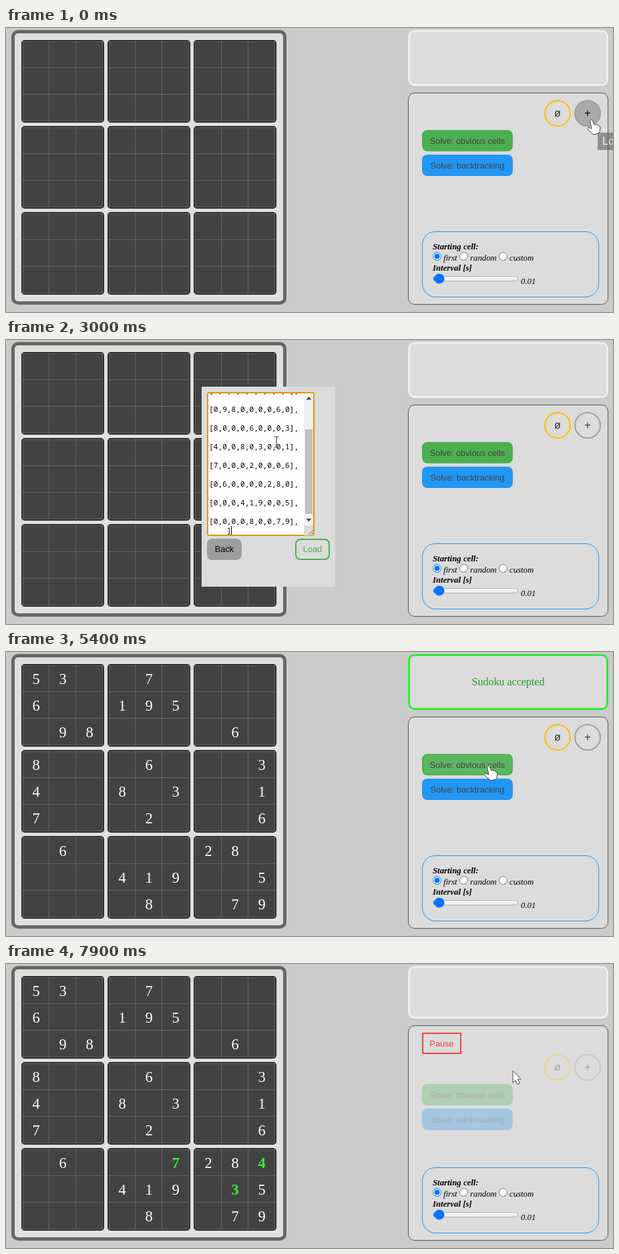
An HTML page for the animation above (8000 ms loop, 909 px wide and 426 px high).

```html
<!DOCTYPE html>
<html lang="en">
<head>
<meta charset="utf-8">
<title>Sudoku solver</title>
<style>
html, body { margin: 0; width: 100%; height: 100%; overflow: hidden; background: #cbcbcb; }
svg { display: block; width: 909px; height: 426px; }
text { white-space: pre; }
.sans { font: 12.8px "Liberation Sans", Arial, sans-serif; text-anchor: middle; }
.sign { font-size: 16px; }
.serif { font: 16px "Liberation Serif", Times, serif; text-anchor: middle; }
.digit { font-size: 22.4px; fill: #fff; }
.label { font: italic 12.8px "Liberation Serif", Times, serif; }
.bold { font-weight: bold; }
.mono { font: 11.2px "Noto Sans Mono", "DejaVu Sans Mono", monospace; }
</style>
</head>
<body>
<svg id="stage" viewBox="0 0 909 426"></svg>
<script>
const LOOP = 8000;
const stage = document.getElementById('stage');

function el(parent, tag, attrs = {}, content) {
  const node = document.createElementNS('http://www.w3.org/2000/svg', tag);
  set(node, attrs);
  if (content !== undefined) node.textContent = content;
  parent.appendChild(node);
  return node;
}
function set(node, attrs) {
  for (const key in attrs) node.setAttribute(key, attrs[key]);
}
const group = (parent, attrs) => el(parent, 'g', attrs);
const path = (parent, d, attrs) => el(parent, 'path', { d, ...attrs });
const circle = (parent, cx, cy, r, attrs) => el(parent, 'circle', { cx, cy, r, ...attrs });
const label = (parent, x, y, cls, content, attrs) => el(parent, 'text', { x, y, class: cls, ...attrs }, content);

// Outer box with the border drawn inside it
function box(parent, x, y, width, height, rx, fill, stroke = 'none', sw = 0) {
  return el(parent, 'rect', {
    x: x + sw / 2, y: y + sw / 2, width: width - sw, height: height - sw,
    rx: Math.max(0, rx - sw / 2), fill, stroke, 'stroke-width': sw
  });
}
const show = (node, on) => set(node, { opacity: +on });
const progress = (t, from, to) => Math.min(1, Math.max(0, (t - from) / (to - from)));
const mix = (a, b, p) => 'rgb(' + a.map((v, i) => Math.round(v + (b[i] - v) * p)) + ')';

// Board
const ROWS = '530070000 600195000 098000060 800060003 400803001 700020006 060000280 000419005 000080079'.split(' ');
const cellX = c => 25 + 40 * c + 9 * Math.floor(c / 3);
const cellY = r => 20 + 40 * r + 9 * Math.floor(r / 3);

box(stage, 8, 3, 412, 412, 10, '#dfe0de', '#666866', 5);
for (let i = 0; i < 9; i++) {
  const x = 23 + 129 * (i % 3), y = 18 + 129 * Math.floor(i / 3);
  box(stage, x, y, 124, 124, 5, '#424242', '#2b2b2b', 2);
  let d = '';
  for (let k = 0; k < 4; k++) {
    const o = 1.5 + 40 * k + (k === 0 ? 1 : 0);
    d += `M${x + o} ${y + 2}v120M${x + 2} ${y + o}h120`;
  }
  path(stage, d, { stroke: '#858585', 'stroke-dasharray': '1 1', fill: 'none' });
}
const givens = group(stage);
ROWS.forEach((row, r) => [...row].forEach((n, c) => {
  if (n !== '0') label(givens, cellX(c) + 20, cellY(r) + 28, 'serif digit', n);
}));

const found = [[7, 7, 3, 6450, 6900], [6, 5, 7, 6900, 7400], [6, 8, 4, 7400, 7900]].map(([r, c, n, on, off]) => {
  const g = group(stage);
  const mark = box(g, cellX(c), cellY(r), 40, 40, 0, '#666');
  label(g, cellX(c) + 20, cellY(r) + 28, 'serif digit bold', n, { style: 'fill:#33f033' });
  return { g, mark, on, off };
});

// Message and control panels
const message = box(stage, 602, 3, 300, 84, 10, '#dcdcdc', '#eee', 3);
const accepted = label(stage, 752, 50, 'serif', 'Sudoku accepted', { fill: '#2c9a2c' });
const panel = box(stage, 602, 97, 300, 318, 10, '#dcdcdc', '#555', 1);

const pause = group(stage);
box(pause, 623, 103, 59, 32, 0, 'none', '#f44336', 2);
label(pause, 652.5, 124, 'sans', 'Pause', { fill: '#f44336' });

const controls = group(stage);
circle(controls, 826, 128, 19, { fill: 'none', stroke: '#ffc107', 'stroke-width': 2 });
label(controls, 826, 133, 'sans sign', 'ø', { fill: '#333' });
const plus = circle(controls, 871, 128, 19, { stroke: '#9e9e9e', 'stroke-width': 2 });
const plusSign = label(controls, 871, 133, 'sans sign', '+');
const green = box(controls, 623, 153, 136, 32, 8, '#4caf50', '#4caf50', 2);
label(controls, 691, 174, 'sans', 'Solve: obvious cells', { fill: '#444' });
box(controls, 623, 190, 136, 32, 8, '#2196f3');
label(controls, 691, 211, 'sans', 'Solve: backtracking', { fill: '#444' });

box(stage, 623, 305, 265, 99, 20, 'none', '#2196f3', 1);
label(stage, 639, 332, 'label bold', 'Starting cell:');
[[645.5, 'first', 655], [685.5, 'random', 695], [744.5, 'custom', 754]].forEach(([x, name, tx], i) => {
  circle(stage, x, 342.5, 6, { fill: '#fff', stroke: i ? '#767676' : '#0075ff' });
  if (!i) circle(stage, x, 342.5, 4, { fill: '#0075ff' });
  label(stage, tx, 349, 'label', name);
});
label(stage, 639, 364, 'label bold', 'Interval [s]');
box(stage, 640, 372, 127, 8, 4, '#efefef', '#b2b2b2', 1);
box(stage, 640, 372, 10, 8, 4, '#0075ff');
circle(stage, 649, 376, 7.5, { fill: '#0075ff' });
label(stage, 771, 384, 'label', '0.01');

// Loading dialog
const dialog = group(stage);
const sheet = box(dialog, 293, 70, 200, 300, 0, '#dcdcdc');
const form = group(dialog);
const areaFocus = box(form, 301, 78, 161, 216, 3, '#fff', '#e59700', 2);
const areaPlain = box(form, 301, 78, 161, 216, 2, '#fff', '#767676', 1);
const clip = el(el(stage, 'defs'), 'clipPath', { id: 'area' });
box(clip, 303, 80, 157, 213, 0, '#000');
const pasted = group(form, { 'clip-path': 'url(#area)' });
ROWS.slice(1).forEach((row, i) => {
  label(pasted, 304, 80 + 28 * i, 'mono', `[${[...row].join(',')}],`);
});
label(pasted, 304, 290, 'mono', '    ]');
box(pasted, 446, 80, 14, 198, 0, '#f1f1f1');
box(pasted, 448, 134, 11, 127, 0, '#c1c1c1');
path(pasted, 'M449.5 89.5L453.5 85L457.5 89.5ZM449.5 268L453.5 272.5L457.5 268Z', { fill: '#444' });
box(pasted, 446, 278, 14, 15, 0, '#dcdcdc');
path(form, 'M453 292l7-7M457 292l3-3', { stroke: '#666' });
const caret = path(form, '', { stroke: '#000' });
box(form, 301, 298, 52, 32, 8, '#9e9e9e');
label(form, 327, 318, 'sans', 'Back');
const load = box(form, 433, 298, 52, 32, 8, 'none', '#4caf50', 2);
const loadRing = group(form);
box(loadRing, 432, 297, 54, 34, 5, 'none', '#fff', 1);
box(loadRing, 433, 298, 52, 32, 4, 'none', '#e59700', 2);
const loadText = label(form, 459, 318, 'sans', 'Load');

// Tooltip and pointers
const tip = group(stage);
box(tip, 0, 0, 60, 26, 0, '#555');
label(tip, 7, 18, 'sans sign', 'Load', { fill: '#fff', style: 'text-anchor:start' });

const outline = { fill: '#fff', stroke: '#333', 'stroke-width': 0.9, 'stroke-linejoin': 'round' };
const pointers = {
  hand: path(stage, 'M-2.5 2Q-1-1 1.5 1.5L3.5 8Q6 6 7.5 8.5Q10 7 11 10Q13 9.5 13 13L12 19L10 21L3 23L-5 16Q-8 13-5 12L0 14Z', outline),
  arrow: path(stage, 'M0 0V18L4 14.5L7 20.5L10.2 19L7.5 13H12.3Z', outline),
  beam: path(stage, 'M-3.5-8H-1L0-7L1-8H3.5M0-7V7M-3.5 8H-1L0 7L1 8H3.5', { fill: 'none', stroke: '#444', 'stroke-width': 1.2 })
};

// Time, x, y of the pointer
const ROUTE = [
  [0, 877, 137], [900, 880, 125], [1000, 880, 125], [1800, 405, 153], [3000, 405, 153],
  [3700, 470, 316], [4200, 470, 316], [4400, 465, 315], [5000, 856, 215], [5400, 723, 170],
  [5900, 729, 166], [6400, 729, 166], [6700, 749, 168], [6800, 749, 168], [6900, 738, 166],
  [7000, 738, 166], [7100, 768, 181], [7200, 765, 175], [7300, 765, 175], [7600, 759, 160], [8000, 759, 160]
];
function pointerAt(t) {
  const i = ROUTE.findIndex(k => k[0] > t);
  const a = ROUTE[i - 1], b = ROUTE[i];
  let p = progress(t, a[0], b[0]);
  p = p * p * (3 - 2 * p);
  return [a[1] + (b[1] - a[1]) * p, a[2] + (b[2] - a[2]) * p];
}
function pointerKind(t, x, y) {
  const inside = (l, top, r, bottom) => x >= l && x <= r && y >= top && y <= bottom;
  if (t > 1000 && t < 4200 && inside(301, 78, 462, 294)) return 'beam';
  if (t < 4200 && inside(433, 298, 485, 330)) return 'hand';
  if (t < 6450 && (inside(623, 153, 759, 222) || inside(851, 108, 891, 148))) return 'hand';
  return 'arrow';
}

function render(t) {
  const loaded = t >= 4150, solving = t >= 6450;

  show(givens, loaded);
  for (const f of found) {
    show(f.g, t >= f.on);
    show(f.mark, t < f.off);
  }

  const shrink = solving ? 5 : 0;
  set(message, { height: 81 - shrink, stroke: loaded && !solving ? '#33ea33' : '#eee' });
  set(panel, { y: 97.5 - shrink, height: 317 + shrink });
  show(accepted, loaded && !solving);
  show(pause, solving);
  set(controls, { transform: `translate(0 ${solving ? 27 : 0})`, opacity: solving ? 0.3 : 1 });

  const leave = progress(t, 1050, 1300);
  set(plus, { fill: mix([170, 170, 170], [220, 220, 220], leave) });
  set(plusSign, { fill: mix([0, 0, 0], [51, 51, 51], leave) });
  const glow = progress(t, 5200, 5380), press = progress(t, 6000, 6300);
  set(green, {
    fill: solving || t < 5200 ? '#4caf50'
      : press ? mix([92, 182, 96], [78, 167, 82], press)
      : mix([76, 175, 80], [92, 182, 96], glow)
  });

  const fadeIn = t < 950 ? 0 : 0.644 + 0.356 * progress(t, 1000, 1250);
  const fadeOut = 1 - progress(t, 4200, 4900) ** 1.5;
  show(dialog, fadeIn * fadeOut);
  set(sheet, { fill: mix([255, 255, 255], [220, 220, 220], progress(t, 1000, 1500)) });
  show(form, progress(t, 1050, 1500));
  show(areaFocus, t >= 1750 && !loaded);
  show(areaPlain, t < 1750 || loaded);
  show(pasted, t >= 2950);
  const blink = t < 2950 ? t >= 1800 && t < 2400 : !loaded && (t - 2950) % 1000 < 500;
  show(caret, blink);
  set(caret, { d: t < 2950 ? 'M304.5 81v14' : 'M337.5 279v13' });
  const over = progress(t, 3450, 3650);
  set(load, {
    fill: loaded ? '#3e8e41' : mix([220, 220, 220], [76, 175, 80], over)
  });
  show(loadRing, loaded);
  set(loadText, { fill: mix([76, 175, 80], [20, 20, 20], over) });

  const late = t >= 850;
  set(tip, {
    transform: late ? 'translate(895 141)' : 'translate(886 157)',
    opacity: late ? (t < 1100 ? 0.06 : 0) : 0.55 * (1 - progress(t, 0, 300))
  });

  const [x, y] = pointerAt(t), kind = pointerKind(t, x, y);
  for (const name in pointers) {
    show(pointers[name], name === kind);
    set(pointers[name], { transform: `translate(${x.toFixed(1)} ${y.toFixed(1)})` });
  }
}

const start = performance.now();
function tick() {
  render((performance.now() - start) % LOOP);
  requestAnimationFrame(tick);
}
tick();
</script>
</body>
</html>
```
